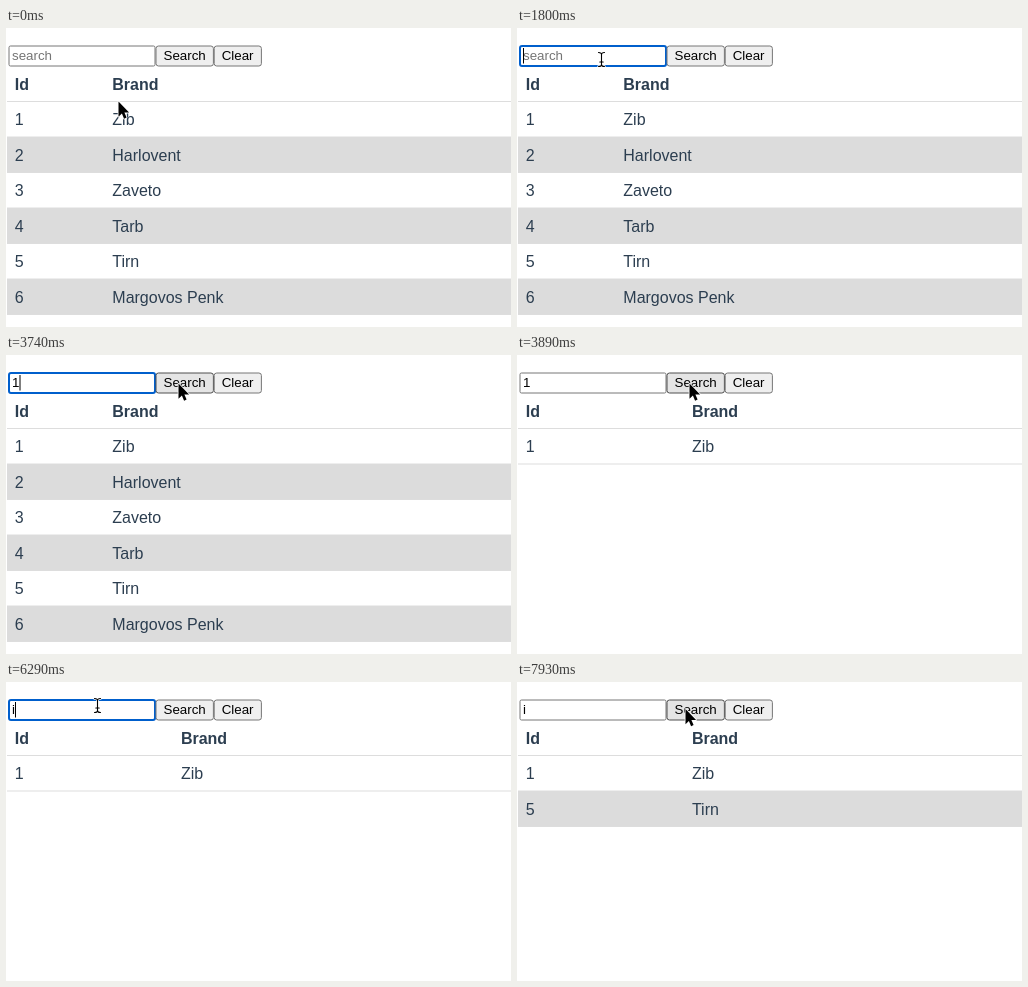
Recreate the animation shown at these times as an HTML page. Size 505x299 px, loop 8 s.

```html
<!DOCTYPE html>
<html lang="en">
<head>
<meta charset="utf-8">
<title>Table search</title>
<style>
  html, body { margin: 0; width: 100%; height: 100%; overflow: hidden; background: #fff; }
  svg { display: block; width: 505px; height: 299px; }
  text { font-family: "Liberation Sans", Arial, sans-serif; white-space: pre; }
  .cell { font-size: 16px; fill: #2c3e50; }
  .head { font-weight: bold; }
  .ctl { font-size: 13.333px; fill: #000; }
</style>
</head>
<body>
<svg id="stage" viewBox="0 0 505 299" xmlns="http://www.w3.org/2000/svg"></svg>
<script>
const LOOP = 8000;
const PITCH = 35.5, HEAD_LINE = 73;
const BRANDS = ["Zib", "Harlovent", "Zaveto", "Tarb", "Tirn", "Margovos Penk"];
const ALL = [1, 2, 3, 4, 5, 6];

// Latest entry whose time has passed wins.
const at = (track, t) => track.reduce((v, [time, value]) => (t >= time ? value : v), track[0][1]);

const RESULTS = [[0, ALL], [3890, [1]], [7330, [1, 5]]];
const VALUE = [[0, ""], [2690, "1"], [5840, ""], [6290, "i"]];
const FOCUS = [[0, false], [1800, true], [3890, false], [5240, true], [7180, false]];
const PRESSED = [[0, false], [7180, true], [7330, false]];
const CARET = [[0, false], [1800, true], [2250, false], [2690, true], [3140, false], [3590, true],
               [3890, false], [5240, true], [5690, false], [6290, true], [6740, false]];
const CARET_X = { "": 6, "1": 13.5, "i": 9 };

// Pointer moves: start time, number of 150 ms steps, end point, upward arc.
const HOME = [112.5, 73.5];
const MOVES = [
  { start: 150, steps: 6, to: [84.5, 31.5], arc: 0 },
  { start: 3140, steps: 5, to: [172.5, 28.5], arc: 0 },
  { start: 4640, steps: 3, to: [91.5, 23.5], arc: 0 },
  { start: 6740, steps: 3, to: [174.5, 23.5], arc: 21 },
  { start: 7930, steps: 1, to: [168.5, 27], arc: 0 }
];

const stage = document.getElementById("stage");

function add(parent, tag, attrs, text) {
  const el = document.createElementNS(stage.namespaceURI, tag);
  set(el, attrs);
  if (text !== undefined) el.textContent = text;
  parent.appendChild(el);
  return el;
}

function set(el, attrs) {
  for (const key in attrs) el.setAttribute(key, attrs[key]);
}

function cell(parent, x, row, text, head) {
  add(parent, "text", { class: head ? "cell head" : "cell", x, y: 61.5 + row * PITCH }, text);
}

function control(x, width, label) {
  const box = add(stage, "rect", { x, y: 18, width, height: 20, rx: 2.5, fill: "#efefef", stroke: "#767676" });
  add(stage, "text", { class: "ctl", x: x + 7.5, y: 32 }, label);
  return box;
}

add(stage, "rect", { width: 505, height: 299, fill: "#fff" });
const table = add(stage, "g", {});
const field = add(stage, "rect", { x: 3, y: 18, width: 146, height: 20, fill: "#fff" });
const fieldText = add(stage, "text", { class: "ctl", x: 6, y: 32 }, "");
const caret = add(stage, "rect", { y: 20, width: 1, height: 15.5 });
const search = control(150, 57.4, "Search");
control(208.2, 47.2, "Clear");

const arrow = add(stage, "path", {
  d: "M0 0V15.2L3.4 12L5.6 17.2L8.1 16.1L5.9 11.1H10.6Z",
  fill: "#000", stroke: "#fff", "stroke-width": 1.6, "paint-order": "stroke", "stroke-linejoin": "round"
});
const beam = add(stage, "g", { fill: "none", "stroke-linecap": "round" });
const BEAM_PATH = "M-3 -7Q0 -7 0 -5Q0 -7 3 -7M0 -5V5M-3 7Q0 7 0 5Q0 7 3 7M-1.7 2.5H1.7";
add(beam, "path", { d: BEAM_PATH, stroke: "#fff", "stroke-width": 2.4 });
add(beam, "path", { d: BEAM_PATH, stroke: "#000", "stroke-width": 1.1 });

function pointer(t) {
  let pos = HOME;
  for (const { start, steps, to, arc } of MOVES) {
    if (t < start) break;
    const u = Math.min(1, (Math.floor((t - start) / 150) + 1) / steps);
    const k = u * u * (3 - 2 * u);
    pos = [
      pos[0] + (to[0] - pos[0]) * k,
      pos[1] + (to[1] - pos[1]) * k - arc * Math.sin(Math.PI * k)
    ];
  }
  return pos;
}

let shownRows = null;

function drawTable(ids) {
  if (ids === shownRows) return;
  shownRows = ids;
  table.replaceChildren();
  const brandX = ids === ALL ? 106.3 : 174.9;
  ids.forEach((id, i) => {
    if (i % 2) add(table, "rect", { x: 1, y: HEAD_LINE + 0.5 + i * PITCH, width: 504, height: PITCH, fill: "#dcdcdc" });
  });
  for (let i = 0; i <= ids.length; i++) {
    add(table, "rect", { x: 1, y: HEAD_LINE + i * PITCH, width: 504, height: 1, fill: "#ddd" });
  }
  cell(table, 8.7, 0, "Id", true);
  cell(table, brandX, 0, "Brand", true);
  ids.forEach((id, i) => {
    cell(table, 8.7, i + 1, id);
    cell(table, brandX, i + 1, BRANDS[id - 1]);
  });
}

function render(t) {
  const [x, y] = pointer(t);
  const inRow = y >= 17 && y <= 39;
  const overField = inRow && x >= 2 && x < 150;
  const overSearch = inRow && x >= 150 && x < 208;
  const focus = at(FOCUS, t), value = at(VALUE, t), pressed = at(PRESSED, t);

  drawTable(at(RESULTS, t));

  set(field, {
    stroke: focus ? "#005fcc" : overField ? "#4f4f4f" : "#767676",
    "stroke-width": focus ? 2 : 1,
    rx: focus ? 2 : 1.5
  });
  fieldText.textContent = value || "search";
  fieldText.style.fill = value ? "#000" : "#757575";
  set(caret, { x: CARET_X[value], visibility: at(CARET, t) ? "visible" : "hidden" });

  set(search, {
    fill: pressed ? "#f5f5f5" : overSearch ? "#e5e5e5" : "#efefef",
    stroke: pressed ? "#8d8d8d" : overSearch ? "#4f4f4f" : "#767676"
  });

  const transform = `translate(${x} ${y})`;
  set(arrow, { transform, visibility: overField ? "hidden" : "visible" });
  set(beam, { transform, visibility: overField ? "visible" : "hidden" });
}

function tick() {
  render(performance.now() % LOOP);
  requestAnimationFrame(tick);
}
tick();
</script>
</body>
</html>
```
